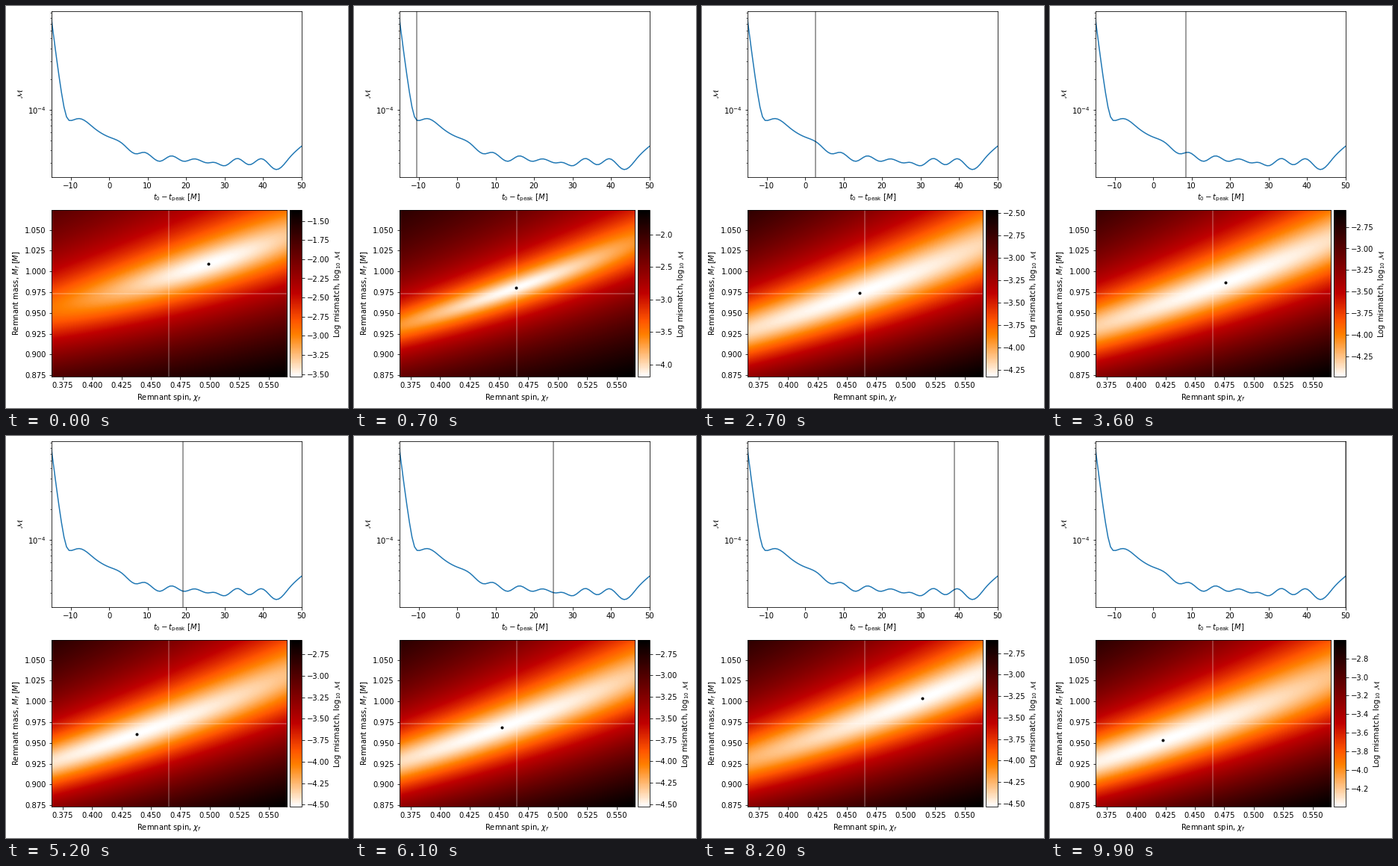
A matplotlib script that plays this animation: 458 by 538 pixels, repeating every 10000 ms.

```python
import numpy as np
import matplotlib.pyplot as plt
from matplotlib.animation import FuncAnimation

W, H, DPI = 458, 538, 72
FRAMES = 100
CHI, MASS, SPAN = 0.4655, 0.9735, 0.1   # true remnant values, half range

plt.rcParams.update({"font.family": "DejaVu Sans", "font.size": 10})


def spline(x, xs, ys):
    """Natural cubic spline through (xs, ys)."""
    n, h = len(xs), np.diff(xs)
    slope = np.diff(ys) / h
    a, r = np.eye(n), np.zeros(n)
    for i in range(1, n - 1):
        a[i, i - 1:i + 2] = h[i - 1], 2 * (h[i - 1] + h[i]), h[i]
        r[i] = 6 * (slope[i] - slope[i - 1])
    m = np.linalg.solve(a, r)
    k = np.clip(np.searchsorted(xs, x) - 1, 0, n - 2)
    u, v, hk = xs[k + 1] - x, x - xs[k], h[k]
    return ((m[k] * u**3 + m[k + 1] * v**3) / (6 * hk)
            + (ys[k] / hk - m[k] * hk / 6) * u
            + (ys[k + 1] / hk - m[k + 1] * hk / 6) * v)


# Bends and turning points of the log10 mismatch over start time
TURNS = np.array([
    (-15, -3.105), (-12.5, -3.80), (-11.1, -4.065), (-9.9, -4.106),
    (-8, -4.086), (-4, -4.176), (0, -4.267), (3.4, -4.329), (7, -4.432),
    (9.2, -4.417), (13.2, -4.505), (16.1, -4.452), (19.4, -4.505),
    (22.1, -4.481), (25.6, -4.521), (27.3, -4.515), (30.2, -4.548),
    (33.4, -4.477), (36.5, -4.539), (39.6, -4.479), (43.3, -4.585),
    (46.9, -4.470), (50, -4.358)])

# Start time, best-fit spin, best-fit mass
BEST = np.array([
    (-15, 0.499, 1.009), (-3.8, 0.4405, 0.959), (8.6, 0.476, 0.987),
    (19.1, 0.438, 0.961), (31, 0.489, 0.990), (38.8, 0.514, 1.0035),
    (50, 0.423, 0.953)])

times = np.linspace(-15, 50, FRAMES)
log_mm = spline(times, *TURNS.T)
key_t, key_chi, key_mass = BEST.T
best_chi = spline(times, key_t, key_chi)
best_mass = spline(times, key_t, key_mass)


def ratio(chi, mass):
    """Log of mass over the dimensionless ringdown frequency."""
    return np.log(mass / (1.5251 - 1.1568 * (1 - chi)**0.1292))


cells = (np.arange(100) + 0.5) / 100 * 2 * SPAN - SPAN
chi_grid, mass_grid = np.meshgrid(CHI + cells, MASS + cells)
ratio_grid = ratio(chi_grid, mass_grid)


def heat(t, log_true, chi, mass):
    """Log mismatch over the grid, with its lower and upper bounds."""
    early = np.exp(-(t + 15) / 3)
    off = ratio(chi, mass) - ratio(CHI, MASS)
    low = log_true - 0.14 * early - 18 * (chi - CHI)**2 - 960 * off**2
    high = -2.58 - 0.0005 * t + 1.21 * np.exp(-((t + 15) / 10.55)**1.68)

    along = chi_grid - chi
    across = ratio_grid - ratio(chi, mass) + (0.037 + 0.1 * early) * along
    skew = (2.45 + 0.75 * early) * across + 2.5 * (chi_grid - CHI)
    shape = across**2 * np.exp(-skew) + (0.017 + 0.028 * early) * along**2
    shape /= shape.max()
    return np.log10(10**low + (10**high - 10**low) * shape), low, high


fig = plt.figure(figsize=((W + 0.01) / DPI, (H + 0.01) / DPI), dpi=DPI,
                 facecolor="white")


def axes_px(left, top, width, height):
    return fig.add_axes([left / W, 1 - (top + height) / H,
                         width / W, height / H])


LEFT, TOP, WIDTH, HEIGHT = 60.75, 6.6, 334.8, 222.38
LOWER = TOP + 1.2 * HEIGHT
GAP = 3.6
MAP_W = (WIDTH - GAP) / 1.05

top = axes_px(LEFT, TOP, WIDTH, HEIGHT)
top.semilogy(times, 10**log_mm)
top.set_xlim(-15, 50)
top.set_xlabel(r"$t_0 - t_\mathrm{peak}\ [M]$")
top.set_ylabel(r"$\mathcal{M}$")
cursor = top.axvline(times[0], color="k", alpha=0.5)

ax = axes_px(LEFT, LOWER, MAP_W, HEIGHT)
image = ax.imshow(np.zeros_like(chi_grid), cmap="gist_heat_r", origin="lower",
                  aspect="auto", interpolation="bicubic", vmin=-4, vmax=-2,
                  extent=[CHI - SPAN, CHI + SPAN, MASS - SPAN, MASS + SPAN])
ax.axhline(MASS, color="white", alpha=0.3)
ax.axvline(CHI, color="white", alpha=0.3)
dot, = ax.plot([], [], "o", color="k", markersize=3)
ax.set_xlabel(r"Remnant spin, $\chi_f$")
ax.set_ylabel(r"Remnant mass, $M_f\ [M]$")

cax = axes_px(LEFT + MAP_W + GAP, LOWER, 0.05 * MAP_W, HEIGHT)
bar = fig.colorbar(image, cax=cax)
bar.set_label(r"Log mismatch, $\mathrm{log}_{10}\ \mathcal{M}$")


def update(i):
    field, low, high = heat(times[i], log_mm[i], best_chi[i], best_mass[i])
    image.set_data(field)
    image.set_clim(low, high)
    cursor.set_xdata([times[i]] * 2)
    dot.set_data([best_chi[i]], [best_mass[i]])
    return image, cursor, dot


anim = FuncAnimation(fig, update, frames=FRAMES, interval=100,
                     repeat=True, repeat_delay=0)
plt.show()
```
